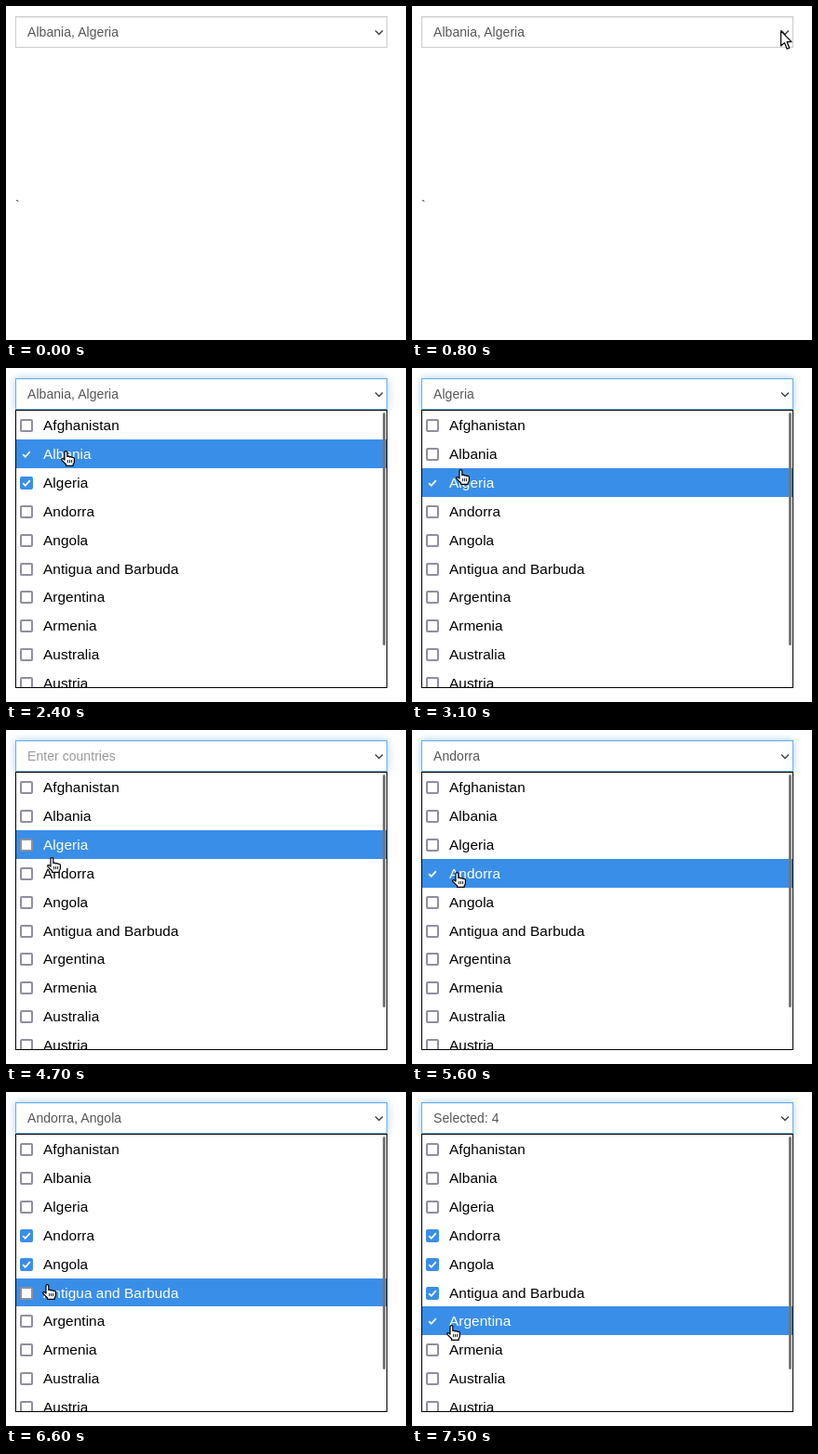
Recreate the animation shown at these times as an HTML page. Size 430 by 360 pixels, loop 8000 ms.

```html
<!DOCTYPE html>
<html lang="en">
<head>
<meta charset="utf-8">
<title>Country multiselect</title>
<style>
  html, body { margin: 0; width: 100%; height: 100%; overflow: hidden; background: #fff; }
  body { position: relative; font-family: "Liberation Sans", Arial, sans-serif; letter-spacing: .05px; }
  #note, #field, #list, #cursor, .row, .row span, .box, #thumb, #field svg { position: absolute; }
  #note { left: 10px; top: 205px; font-size: 14px; line-height: 20px; color: #333; }
  #field {
    left: 10px; top: 11px; width: 400px; height: 34px; box-sizing: border-box;
    border: 1px solid #ccc; padding-left: 12px;
    font-size: 14px; line-height: 32px; color: #555; white-space: nowrap;
    box-shadow: inset 0 1px 1px rgba(0, 0, 0, .075);
  }
  #field.opening { border-color: #b0c3d3; }
  #field.focus {
    border-color: #66afe9;
    box-shadow: inset 0 1px 1px rgba(0, 0, 0, .075), 0 0 8px rgba(102, 175, 233, .6);
  }
  #field.empty { color: #999; }
  #field svg { left: 383.5px; top: 11px; }
  #list {
    left: 10px; top: 45px; width: 400px; height: 300px; box-sizing: border-box;
    border: 1px solid #000; background: #fff; overflow: hidden;
  }
  .row { left: 0; width: 398px; font-size: 15.4px; line-height: 31px; color: #000; }
  .row span { left: 29px; top: 0; white-space: nowrap; }
  .row.hover { background: #398ee8; color: #fff; }
  .box {
    left: 4px; top: 9px; width: 14px; height: 14px; box-sizing: border-box;
    border: 2px solid #8f8f9d; border-radius: 2px; background: #fff;
  }
  .box svg { display: none; position: absolute; left: -2px; top: -2px; }
  .on .box { background: #398ee8; border-color: #398ee8; }
  .on .box svg { display: block; }
  #thumb { left: 394px; top: 2px; width: 3px; height: 251px; border-radius: 2px; background: #777; }
  #cursor { left: 0; top: 0; overflow: visible; }
</style>
</head>
<body>
<div id="note">`</div>
<div id="field"><span id="value"></span>
  <svg width="12" height="12" fill="none" stroke="#444" stroke-width="1.5"><path d="M2 3.5L6 7.5 10 3.5"/></svg>
</div>
<div id="list"><div id="thumb"></div></div>
<svg id="cursor" width="20" height="24" fill="#fff" stroke="#000" stroke-width="1.2" stroke-linejoin="round">
  <path id="arrow" d="M.6.8V17L4.4 13.6 7.2 20.3 9.8 19.2 7.1 12.7H12Z"/>
  <g id="hand" transform="translate(-4 0)">
    <path d="M4 10V2a1.4 1.4 0 0 1 2.8 0v4.5q1.4-.9 2.6.4 1.4-.8 2.6.5 2-.5 2.4 1.2V12q0 1.5-1.2 2.6v1.8H5.6V15L1 10.4Q.2 9 1.4 8.6 2.6 8.3 4 10Z"/>
    <path d="M7.6 10v3.2M9.6 10v3.2M11.6 10v3.2" stroke-width=".9"/>
  </g>
</svg>
<script>
  const LOOP = 8000, STEP = 100, ENTER = 300, OPEN = 1500, FOCUS = 1600;
  const countries = ["Afghanistan", "Albania", "Algeria", "Andorra", "Angola",
    "Antigua and Barbuda", "Argentina", "Armenia", "Australia", "Austria"];

  // Each click toggles the next row down, starting with row 1.
  const clicks = [2800, 3800, 5600, 6200, 6900, 7500];
  const preset = [1, 2];

  // Pointer glides: first step, last step, resting place of the tip.
  const origin = { x: 311, y: -9 };
  const glides = [
    { from: ENTER, to: 800, x: 396, y: 26 },
    { from: 1900, to: 2500, x: 54, y: 91 },
    { from: 3000, to: 3300, x: 50, y: 116 },
    { from: 4400, to: 4900, x: 48, y: 140 },
    { from: 5600, to: 6000, x: 45, y: 182 },
    { from: 6400, to: 6700, x: 43, y: 209 },
    { from: 6900, to: 7300, x: 41, y: 251 }
  ];

  const $ = id => document.getElementById(id);
  const field = $("field"), value = $("value"), list = $("list");
  const cursor = $("cursor"), arrow = $("arrow"), hand = $("hand");
  const rowTop = i => Math.round(46.12 + 30.88 * i);
  const show = (el, on) => { el.style.display = on ? "" : "none"; };
  const easeOut = k => Math.sin(k * Math.PI / 2);

  const rows = countries.map((name, i) => {
    const row = document.createElement("div");
    row.style.top = rowTop(i) - rowTop(0) + "px";
    row.style.height = rowTop(i + 1) - rowTop(i) + "px";
    row.innerHTML = `<div class="box"><svg width="14" height="14" fill="none" stroke="#fff"
      stroke-width="1.8"><path d="M3.2 7.2L5.8 9.8 10.8 4.2"/></svg></div><span>${name}</span>`;
    list.insertBefore(row, $("thumb"));
    return row;
  });

  function pointAt(t) {
    let { x, y } = origin;
    for (const g of glides) {
      if (t < g.from) break;
      const k = easeOut(Math.min(1, (t - g.from + STEP) / (g.to - g.from + STEP)));
      x += (g.x - x) * k;
      y += (g.y - y) * k;
    }
    return [Math.round(x), Math.round(y)];
  }

  const isChecked = (i, t) => preset.includes(i) !== (clicks[i - 1] <= t);

  function label(names) {
    if (!names.length) return "Enter countries";
    return names.length > 3 ? "Selected: " + names.length : names.join(", ");
  }

  function render(time) {
    const t = Math.floor(time / STEP) * STEP;
    const names = countries.filter((_, i) => isChecked(i, t));
    const [x, y] = pointAt(t);
    const open = t >= OPEN;
    const overList = open && y >= rowTop(0);

    value.textContent = label(names);
    field.className = (t >= FOCUS ? "focus" : open ? "opening" : "") + (names.length ? "" : " empty");
    show(list, open);
    rows.forEach((row, i) => {
      const hover = (i === 0 || y >= rowTop(i)) && y < rowTop(i + 1);
      row.className = "row" + (hover ? " hover" : "") + (isChecked(i, t) ? " on" : "");
    });

    show(cursor, t >= ENTER);
    show(arrow, !overList);
    show(hand, overList);
    cursor.style.transform = `translate(${x}px, ${y}px)`;
  }

  const start = performance.now();
  function tick() {
    render((performance.now() - start) % LOOP);
    requestAnimationFrame(tick);
  }
  tick();
</script>
</body>
</html>
```
